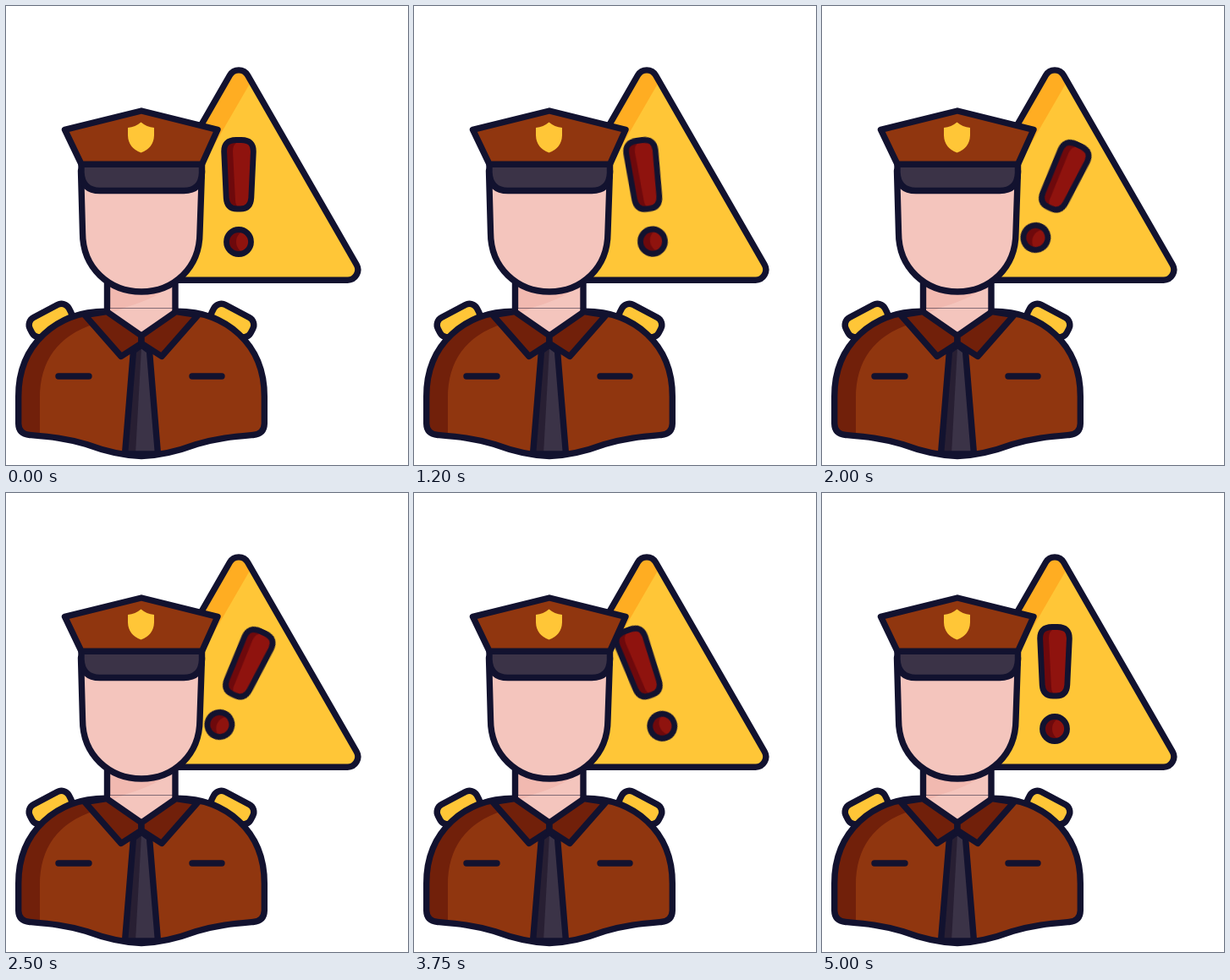
These frames come from a looping animation (475 by 543 pixels, 5050 ms). An HTML page without scripts:

```html
<!DOCTYPE html>
<html lang="en">
<head>
<meta charset="utf-8">
<title>Officer with warning sign</title>
<style>
  html, body { margin: 0; width: 100%; height: 100%; overflow: hidden; background: #fff; }
  svg { display: block; width: 100vw; height: 100vh; }

  .ink { stroke: #12122f; stroke-width: 7.4; stroke-linejoin: round; stroke-linecap: round; }
  .line { fill: none; }
  .yellow { fill: #ffc637; }
  .orange { fill: #ffad22; }
  .brown { fill: #90360f; }
  .rust { fill: #71200a; }
  .slate { fill: #3b3347; }
  .dusk { fill: #281f33; }
  .skin { fill: #f4c5bd; }
  .blush { fill: #f1b9b0; }
  .red { fill: #8f130e; }
  .wine { fill: #6e090c; }

  /* Four swings of 750 ms, each followed by a rest of 500 ms */
  .mark { transform-origin: 275px 225.5px; animation: swing 5050ms ease-in-out infinite; }
  .mark .ink { stroke-width: 6.8; }
  @keyframes swing {
    0% { transform: rotate(0deg); }
    14.851%, 24.752% { transform: rotate(-7.5deg); }
    39.604%, 49.505% { transform: rotate(25deg); }
    64.356%, 74.257% { transform: rotate(-20deg); }
    89.109%, 100% { transform: rotate(0deg); }
  }
</style>
</head>
<body>
<svg viewBox="0 0 475 543">
  <defs>
    <path id="sign" d="M264.4 82A12.200 12.200 0 0 1 285.6 82L414.200 306A12.200 12.200 0 0 1 403.5 324.200H146.5A12.200 12.200 0 0 1 135.800 306Z"/>
    <path id="bar" d="M272 158.500H278Q293 158.500 292.300 173L289.800 227Q289 240 277 240H273Q261 240 260.200 227L257.700 173Q257 158.500 272 158.500Z"/>
    <circle id="dot" cx="275" cy="279" r="14.500"/>
    <path id="torso" d="M118 361.300C60 361.300 14.500 400 14.700 462V494Q15 506.500 28 507.500C51 509.500 70 511 95 518.500Q130 531.500 160 532.500Q190 531.500 225 518.500C250 511 269 509.500 292 507.500Q305 506.500 305.300 494V462C305.500 400 260 361.300 202 361.300Z"/>
    <path id="tie" d="M150.500 408L140.500 530H179.500L169.500 408L160 401Z"/>
    <clipPath id="in-sign"><use href="#sign"/></clipPath>
    <clipPath id="in-dot"><use href="#dot"/></clipPath>
    <clipPath id="in-torso"><use href="#torso"/></clipPath>
    <rect id="shoulder" class="yellow ink" x="-26" y="-12.500" width="52" height="25" rx="10" transform="translate(52.5 372) rotate(-28)"/>
    <path id="collar" class="rust ink" d="M93 365.500L119 361.500L160 390V399L136 414.500Z"/>
  </defs>

  <!-- Warning sign -->
  <use href="#sign" class="yellow"/>
  <path class="orange" clip-path="url(#in-sign)" d="M292 85L155 322H120V60H292Z"/>
  <use href="#sign" class="line ink"/>

  <g class="mark">
    <use href="#bar" class="red"/>
    <path class="wine" d="M275 160Q268 163 268 172L271 230Q271 237 277 240H273Q261 240 260.200 227L257.700 173Q257 158.500 272 158.500Z"/>
    <use href="#bar" class="line ink"/>
    <use href="#dot" class="wine"/>
    <circle class="red" cx="286" cy="279" r="14" clip-path="url(#in-dot)"/>
    <use href="#dot" class="line ink"/>
  </g>

  <!-- Body -->
  <use href="#shoulder"/>
  <use href="#shoulder" transform="matrix(-1 0 0 1 320 0)"/>
  <use href="#torso" class="brown"/>
  <path class="rust" clip-path="url(#in-torso)" d="M40 520V464C40 420 61 390 105 376V350H0V520Z"/>
  <path class="ink line" d="M62 438H98M220 438H255"/>

  <path class="skin" d="M119.500 322H200V362L160 390L119.500 362Z"/>
  <path class="blush" d="M119.500 322H200C186 344 158 351 128 361L119.500 362Z"/>
  <path class="ink line" d="M119.500 322V362M200 322V362"/>

  <use href="#tie" class="slate"/>
  <path class="dusk" d="M150.500 408L140.500 530H153L160 404Z"/>
  <use href="#tie" class="line ink"/>
  <use href="#torso" class="line ink"/>
  <path class="skin" d="M123.200 358H196.300V362L160 387L123.200 362Z"/>
  <path class="blush" d="M123.200 358H138L128 361.500L123.200 362Z"/>
  <use href="#collar"/>
  <use href="#collar" transform="matrix(-1 0 0 1 320 0)"/>

  <!-- Head and cap -->
  <path class="skin ink" d="M88.500 195L90.500 268C90.500 310 122 338 160 338C198 338 229 310 229 268L231.500 195Z"/>
  <path class="slate ink" d="M89 187V197Q90 218.500 111 218.500H210Q231 218.500 231.500 197V187Z"/>
  <path class="brown ink" d="M160 124L250 146.300L231.500 187.200H89L69.500 146.300Z"/>
  <path class="yellow" d="M159.500 137.500Q166 143 175 144V153Q174.500 168 159.500 173.500Q144.500 168 144 153V144Q153 143 159.500 137.500Z"/>
</svg>
</body>
</html>
```
